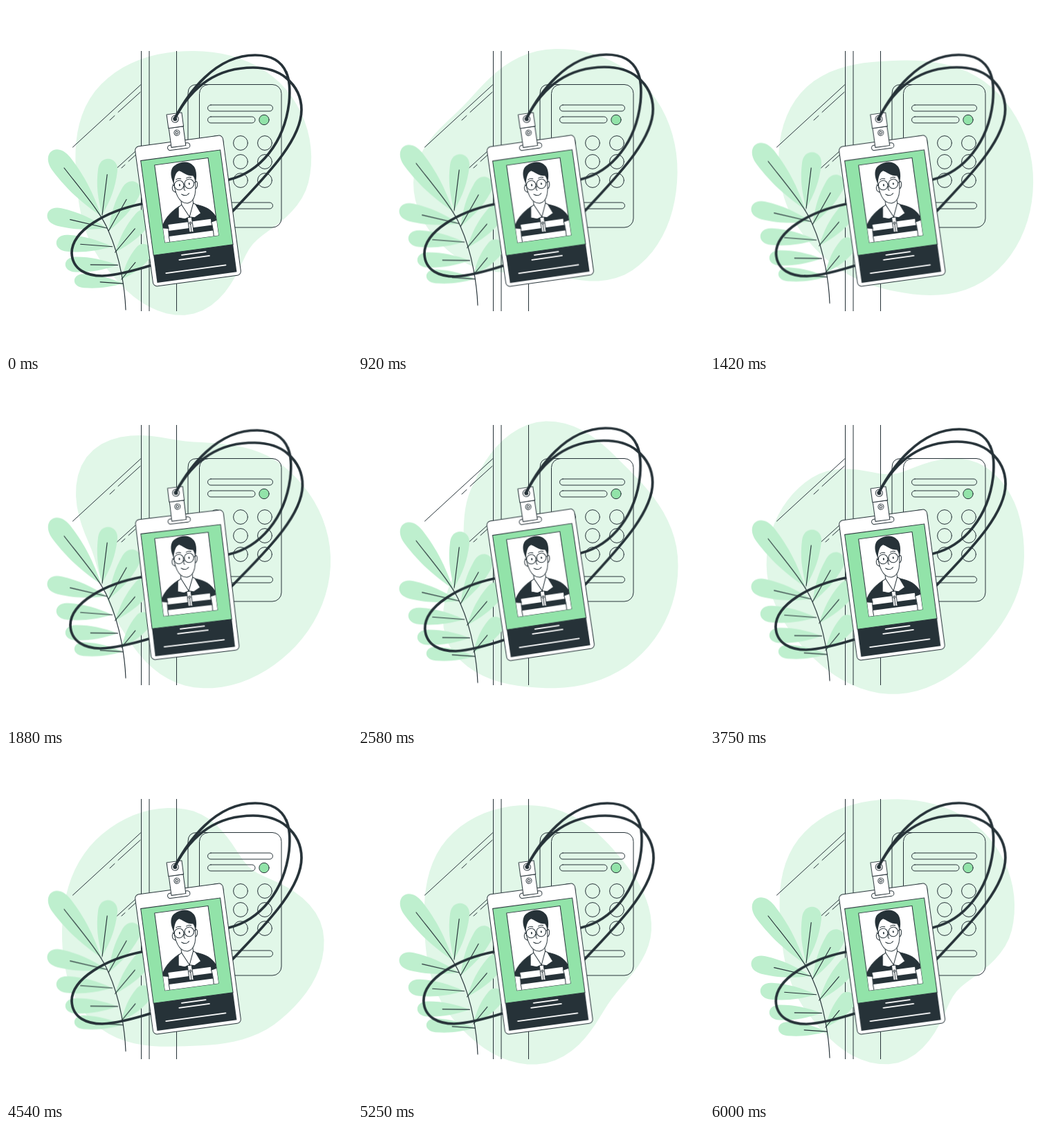
Write an HTML page that moves like this. It is 500 px wide and 500 px high and loops after 6040 ms.

```html
<!DOCTYPE html>
<html lang="en">
<head>
<meta charset="utf-8">
<title>ID badge</title>
<style>
  html, body { margin: 0; width: 100%; height: 100%; overflow: hidden; background: #fff; }
  svg { display: block; width: 100%; height: 100%; }
  .line { fill: none; stroke: #263238; stroke-width: 1; stroke-linecap: round; stroke-linejoin: round; }
  .paper { fill: #fff; stroke: #263238; stroke-width: 1; stroke-linejoin: round; }
  .dark { fill: #263238; }
  .green { fill: #92e3a9; stroke: #263238; stroke-width: 1; }
  .cord { fill: none; stroke: #263238; stroke-width: 3.7; stroke-linecap: round; }
  #leaves { fill: #beefce; }
  #plant .line { stroke-width: 1.15; }
  #plant { animation: float 3020ms ease-in-out infinite; }
  #badge { transform-origin: 261px 238px; animation: sway 1510ms linear infinite; }
  @keyframes float { 50% { transform: translateY(-9.6px); } }
  @keyframes sway {
    0%, 100% { transform: rotate(0); }
    25% { transform: rotate(1deg); }
    75% { transform: rotate(-1deg); }
  }
</style>
</head>
<body>
<svg viewBox="0 0 500 500">
  <defs>
    <clipPath id="frame"><rect x="-39" y="-72" width="78" height="113"/></clipPath>
  </defs>

  <polygon id="blob" fill="#e1f7e8"/>

  <g id="door" class="line">
    <path d="M195.500 65V441M207 65V441M246.500 65V441" stroke-linecap="butt"/>
    <path d="M96.500 204L194.500 114M194 124.500L162 153.500M157 158.500L150 165M160.500 234L187 210M187 215.500L177 224.500M172 229.500L167 234M133.500 257.500h.5"/>
  </g>

  <g id="keypad" class="line">
    <path d="M328 113.500H276Q263 113.500 263 126.500V307Q263 320 276 320"/>
    <rect x="279.500" y="113.500" width="118.500" height="206.500" rx="13"/>
    <rect x="291.500" y="143" width="94" height="9" rx="4.500"/>
    <rect x="291.500" y="160" width="68.500" height="9" rx="4.500"/>
    <rect x="291.500" y="284" width="94" height="9" rx="4.500"/>
    <circle class="green" cx="373" cy="164.500" r="7.200"/>
    <g id="keys"></g>
  </g>

  <g id="plant">
    <g id="leaves"></g>
    <path id="veins" class="line"/>
    <path class="line" d="M173 439C172 412 166 365 148 325C138 300 112 270 84 234"/>
  </g>

  <g id="badge">
    <path class="cord" d="M215 282L196 286C146 296 95 324 95 357C96 382 118 390 139 390C162 389 190 381 212 374"/>
    <path class="cord" d="M310 255L322 251C367 240 402 198 409 140C411 120 410 107 405 96"/>
    <path class="cord" d="M318 306L329 295C370 251 427 196 427 150C427 131 418 115 405 104"/>

    <g transform="translate(263 296) rotate(-7.700)">
      <rect class="paper" x="-64" y="-102" width="128" height="204" rx="6"/>
      <rect class="green" x="-58" y="-81" width="116" height="138"/>
      <rect class="dark" x="-58" y="57" width="116" height="40"/>
      <path d="M-17.500 62H17.500M-22 68.500H22M-43.500 85H43.500" stroke="#fff" stroke-width="1.800" stroke-linecap="round"/>

      <rect class="paper" x="-39" y="-72" width="78" height="113"/>
      <g id="portrait" clip-path="url(#frame)">
        <path class="paper" d="M-40 42V19C-36 8 -28 0 -12 -8H11C25 -3 35 2 40 18V42Z"/>
        <path class="dark" d="M-41 20C-36 9 -28 0 -12 -8L0 9L11 -8C25 -3 36 3 41 19L31 21V16H-31V22Z"/>
        <path class="dark" d="M-32 25H32V33H-32Z"/>
        <path class="line" d="M-31 20Q-33 30 -32 42M31 20Q33 30 32 42"/>
        <path class="paper" d="M-2 9H4V31H-2ZM1 16V31"/>
        <circle class="paper" cx="1" cy="18" r="1.400"/>
        <path class="paper" d="M-8 -22V-9L1 10L9 -9V-22Z"/>
        <path class="paper" d="M-8 -10L-13 -7L-15 8L-6 11L1 9ZM9 -10L12 -8L18 6L8 11L1 9Z"/>
        <path class="paper" d="M-14 -39C-19 -41 -20 -31 -14 -29ZM15 -41C20 -43 20 -33 15 -30Z"/>
        <path class="paper" d="M-15 -53C-16 -30 -13 -12 1 -11C14 -12 17 -30 16 -53C10 -64 -9 -64 -15 -53Z"/>
        <path class="dark" d="M-15 -42C-19 -52 -18 -65 -9 -68C-2 -72 11 -72 16 -64C20 -60 20 -49 17 -41L14 -49C5 -50 0 -57 -5 -59C-10 -58 -13 -51 -15 -42Z"/>
        <g class="line">
          <circle cx="-7.800" cy="-38.500" r="6.800"/>
          <circle cx="7" cy="-38.500" r="6.800"/>
          <path d="M-1 -39H.2M-14.500 -39L-17 -40M13.800 -39L17 -40M-11 -47Q-7 -49 -4 -47M4 -47Q8 -49 11 -47"/>
          <path d="M0 -37Q-3 -30 0 -30M-6 -25Q0 -20 5 -25"/>
        </g>
        <ellipse class="dark" cx="-7" cy="-38.500" rx="1" ry="1.700"/>
        <ellipse class="dark" cx="7" cy="-38.500" rx="1" ry="1.700"/>
      </g>

      <rect class="paper" x="-17" y="-97.500" width="32.500" height="7.500" rx="3.700"/>
      <path class="paper" d="M-11.500 -122H9.500V-94H-11.500Z"/>
      <path class="paper" d="M-12 -142H10V-122H-12Z"/>
      <circle class="paper" cx="-.8" cy="-114" r="4"/>
      <circle class="paper" cx="-.8" cy="-114" r="1.800"/>
      <circle class="paper" cx="-.8" cy="-134" r="5"/>
      <circle class="dark" cx="-.8" cy="-134" r="3"/>
    </g>

    <path class="cord" d="M244 162.500C263 126 302 71 360 71C386 71 399 82 405 96"/>
    <path class="cord" d="M244 162.500C270 113 309 89 357 89C376 89 393 94 405 104"/>
  </g>
</svg>

<script>
const LOOP = 6040, CX = 265, CY = 255, SIDES = 90;
const $ = id => document.getElementById(id);

for (const x of [304, 339, 374])
  for (const y of [198, 225, 252])
    $('keys').innerHTML += `<circle cx="${x}" cy="${y}" r="10.4"/>`;

let veins = '';
function addLeaf(x, y, tipX, tipY, width, vein) {
  const dx = tipX - x, dy = tipY - y, len = Math.hypot(dx, dy), h = width / 2;
  const turn = Math.atan2(dy, dx) * 180 / Math.PI;
  const [a, b, c, d] = [.3, .5, .8, 1.07].map(k => k * len);
  $('leaves').innerHTML += `<path transform="translate(${x} ${y}) rotate(${turn})"
    d="M0 0C${a} ${-.7 * h} ${b} ${-h} ${c} ${-h}C${d} ${-h} ${d} ${h} ${c} ${h}C${b} ${h} ${a} ${.7 * h} 0 0"/>`;
  veins += `M${x} ${y}l${dx * vein} ${dy * vein}`;
}

// One leaf at the top, then pairs that follow the stem down
addLeaf(138, 304, 66, 210, 32, 0);
for (let i = 0; i < 4; i++) {
  const sq = i * i;
  addLeaf(139 + 9.3 * i, 302 + 19 * i + 4 * sq, 149 + 49 * i - 10 * sq, 221 + 30 * i + 4 * sq, 28 - i, .72 - .07 * i);
  addLeaf(146 + 7.7 * i, 321 + 26.7 * i, 60 + 13 * i, 301 + 45 * i - 4.4 * sq, 26 - 2 * i, .62 - .05 * i);
}
$('veins').setAttribute('d', veins);

// Blob poses by start time: eight radii, clockwise from the right
const poses = [
  [0, [172, 128, 191, 172, 163, 190, 190, 194]],
  [920, [196, 182, 130, 161, 185, 158, 191, 205]],
  [1880, [204, 200, 188, 142, 138, 207, 166, 188]],
  [2580, [197, 202, 190, 186, 116, 142, 195, 178]],
  [3750, [189, 184, 199, 185, 183, 163, 119, 185]],
  [4540, [193, 184, 167, 192, 184, 188, 174, 126]],
  [5300, [158, 140, 194, 180, 168, 190, 180, 158]]
];

// Smooth value through a closed ring of values, u of the way from i to i + 1
function ring(values, i, u) {
  const n = values.length;
  const [p, a, b, q] = [-1, 0, 1, 2].map(k => values[(i + k + n) % n]);
  return a + u / 2 * (b - p + u * (2 * p - 5 * a + 4 * b - q + u * (3 * (a - b) + q - p)));
}

function draw() {
  const t = performance.now() % LOOP;
  const i = poses.findLastIndex(([start]) => start <= t);
  const start = poses[i][0], end = i + 1 < poses.length ? poses[i + 1][0] : LOOP;
  const radii = poses[0][1].map((_, k) => ring(poses.map(p => p[1][k]), i, (t - start) / (end - start)));

  const points = Array.from({ length: SIDES }, (_, s) => {
    const pos = s / SIDES * radii.length, angle = s / SIDES * 2 * Math.PI;
    const r = ring(radii, Math.floor(pos), pos % 1);
    return [CX + r * Math.cos(angle), CY + r * Math.sin(angle)];
  });
  $('blob').setAttribute('points', points.join(' '));
  requestAnimationFrame(draw);
}
draw();
</script>
</body>
</html>
```
